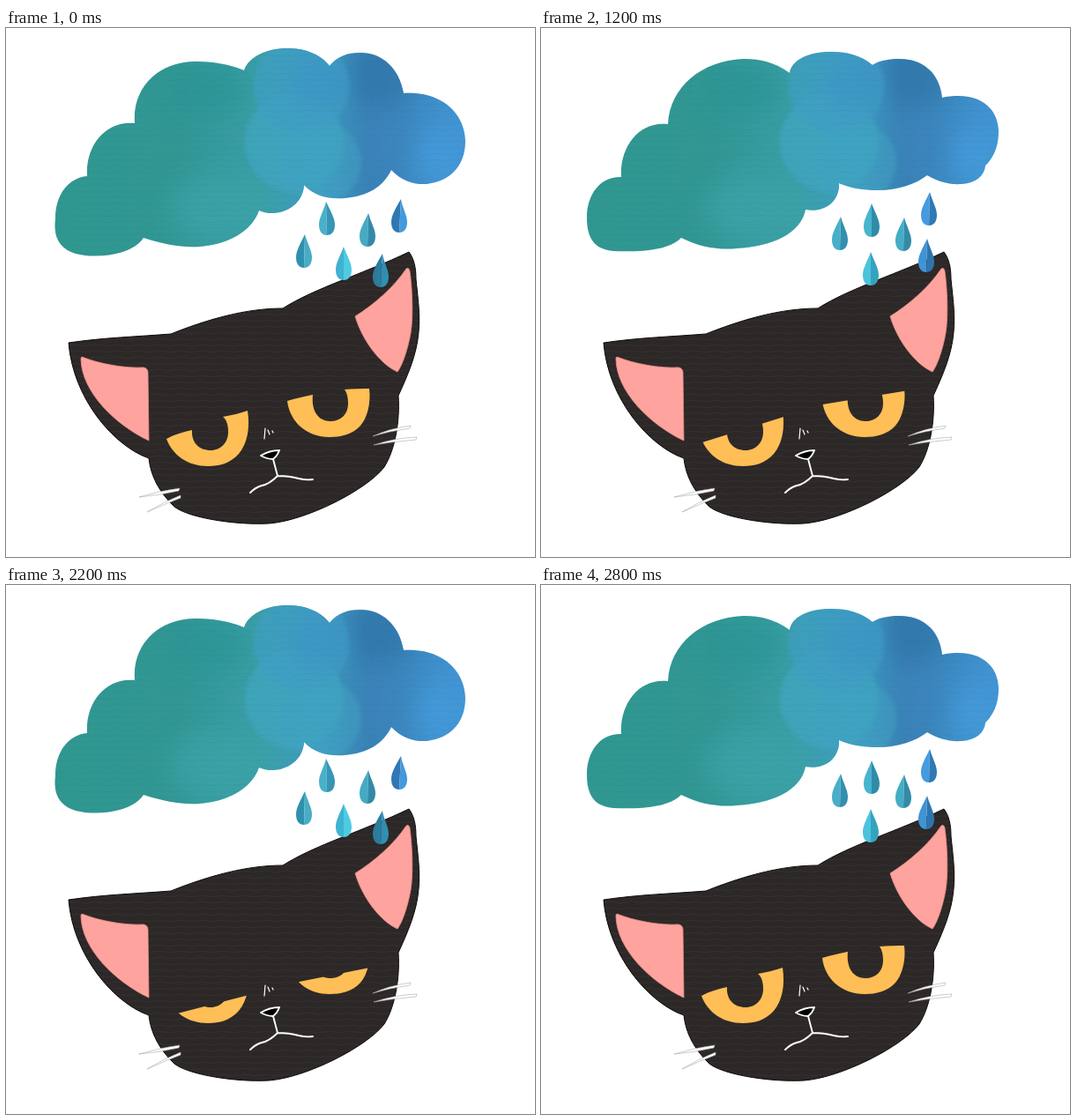
Write an HTML page that moves like this. It is 600 px wide and 600 px high and loops after 3 s.

```html
<!DOCTYPE html>
<html lang="en">
<head>
<meta charset="utf-8">
<title>Rainy cat</title>
<style>
  html, body { margin: 0; width: 100%; height: 100%; overflow: hidden; background: #fff; }
  svg { display: block; width: 100vw; height: 100vh; }
</style>
</head>
<body>
<svg viewBox="0 0 600 600">
  <defs>
    <linearGradient id="sky" gradientUnits="userSpaceOnUse" x1="60" y1="0" x2="520" y2="0">
      <stop offset="0" stop-color="#309790"/>
      <stop offset=".3" stop-color="#329794"/>
      <stop offset=".5" stop-color="#3b9fa8"/>
      <stop offset=".64" stop-color="#3f9dc0"/>
      <stop offset=".77" stop-color="#3981b5"/>
      <stop offset="1" stop-color="#4295d4"/>
    </linearGradient>
    <filter id="soft" x="-30%" y="-30%" width="160%" height="160%"><feGaussianBlur stdDeviation="14"/></filter>
    <filter id="edge" x="-10%" y="-10%" width="120%" height="120%"><feGaussianBlur stdDeviation="2"/></filter>
    <pattern id="fur" width="24" height="7" patternUnits="userSpaceOnUse">
      <path d="M0 3q6-1.5 12 0t12 0" fill="none" stroke="#4a3f3c" stroke-opacity=".28"/>
    </pattern>
    <pattern id="paper" width="24" height="7" patternUnits="userSpaceOnUse">
      <path d="M0 3q6-1.5 12 0t12 0" fill="none" stroke="#14606e" stroke-opacity=".07"/>
    </pattern>
    <clipPath id="cloudClip"><path id="cloud"/></clipPath>
    <clipPath id="lidClip"><path id="lid"/></clipPath>
    <path id="head" d="M71 357C112 351 150 350 187 347C230 330 272 318 314 318C350 295 405 279 457 254
      C463 262 465 272 465 285C467 305 470 325 468 345C466 370 456 393 445 417C447 447 441 479 429 498
      C409 524 340 559 298 562C262 564 208 556 191 543C174 527 164 508 162 488C122 474 76 420 71 357Z"/>
  </defs>

  <g clip-path="url(#cloudClip)">
    <rect x="40" y="10" width="500" height="260" fill="url(#sky)"/>
    <g filter="url(#soft)">
      <ellipse cx="240" cy="205" rx="55" ry="40" fill="#3ba3a8" opacity=".8"/>
      <ellipse cx="230" cy="70" rx="45" ry="30" fill="#2c9595" opacity=".7"/>
      <ellipse cx="425" cy="55" rx="38" ry="36" fill="#2f76a9" opacity=".8"/>
      <ellipse cx="430" cy="130" rx="28" ry="45" fill="#3b83bd" opacity=".7"/>
      <ellipse cx="490" cy="145" rx="25" ry="35" fill="#459bdc" opacity=".8"/>
    </g>
    <g filter="url(#edge)">
      <circle cx="327" cy="130" r="56" fill="#42a6c0" opacity=".75"/>
      <circle cx="335" cy="66" r="54" fill="#419ec4" opacity=".7"/>
      <circle cx="358" cy="152" r="45" fill="#41a1c3" opacity=".5"/>
    </g>
    <ellipse cx="355" cy="65" rx="32" ry="35" fill="#3c92c6" opacity=".6" filter="url(#soft)"/>
    <rect x="40" y="10" width="500" height="260" fill="url(#paper)"/>
  </g>

  <use href="#head" fill="#2c2827" stroke="#0c0a0a" stroke-width="1"/>
  <use href="#head" fill="url(#fur)"/>
  <g fill="#fea39d" stroke="#e98f89" stroke-width=".8">
    <path d="M86 373C106 381 134 386 156 385Q161 386 161 391L162 468C124 450 86 413 85 376Q85 373 86 373Z"/>
    <path d="M454 273Q457 271 458 276C461 297 462 329 459 346C456 363 450 382 444 390C424 381 404 354 396 327C417 314 440 294 454 273Z"/>
  </g>

  <g id="eyes" fill="#ffbe56" clip-path="url(#lidClip)">
    <path d="M182 466C191 461 201 458 211 456C210 470 219 479 232 479C244 479 252 470 252 458C252 450 250 444 246 441C256 439 266 437 274 434C277 453 274 471 264 483C254 494 242 497 229 497C207 497 189 485 182 466Z"/>
    <path d="M319 423C328 420 338 418 348 416C346 434 354 446 368 446C380 446 388 438 388 426C388 420 387 414 384 410C394 409 404 409 412 409C414 425 410 442 402 451C393 461 380 464 367 464C341 464 322 447 319 423Z"/>
  </g>
  <g id="shut" fill="none" stroke="#000" stroke-width="3.6" stroke-linecap="round">
    <path d="M193 485C203 495 217 499 231 498C256 497 274 484 276 465"/>
    <path d="M335 453C347 463 358 465 369 465C392 464 406 452 410 435"/>
  </g>

  <g fill="none" stroke="#fff" stroke-width="1.9" stroke-linecap="round" stroke-linejoin="round">
    <path d="M289 485Q299 479 310 479Q308 485 303 489Q296 489 289 485Z" fill="#000"/>
    <path d="M303 489L308 508C301 515 296 518 290 519Q283 521 277 527M308 508C318 508 325 509 332 511Q340 513 348 512"/>
    <path d="M294 454L293 466M297 456L299 461M302 457L303 459" stroke-width="1.2"/>
  </g>
  <g fill="#fff" stroke="#aaa" stroke-width=".6">
    <path d="M151 532Q174 525 197 522L196 525Q174 530 151 532Z"/>
    <path d="M160 549Q178 538 198 530L198 533Q180 540 160 549Z"/>
    <path d="M416 463Q436 454 459 451L458 454Q436 457 416 463Z"/>
    <path d="M417 473Q440 465 466 464L465 467Q440 469 417 473Z"/>
  </g>
  <g id="rain"></g>
</svg>
<script>
const $ = id => document.getElementById(id);

const clouds = [
  'M92 168C70 170 56 190 56 216C53 240 63 251 79 256C102 262 143 258 156 238C181 246 199 249 219 248C250 246 278 232 287 207C306 216 337 205 338 178C350 191 366 194 384 193C410 191 428 180 437 161C448 173 463 178 477 177C503 174 521 157 521 128C520 95 492 71 451 74C446 45 426 28 402 28C387 28 376 32 367 43C355 28 337 23 319 23C295 23 275 33 270 48C250 40 231 38 213 38C174 39 143 66 146 108C113 105 90 133 92 168Z',
  'M91 169C68 168 52 188 52 215C52 239 61 251 82 253C112 254 144 253 159 238C181 249 203 252 222 250C262 248 295 233 300 206C320 210 339 198 338 176C352 182 366 184 383 184C405 184 425 177 438 167C450 174 463 178 477 177C494 176 503 167 504 156C514 146 519 134 519 117C518 88 494 71 455 79C452 50 432 35 406 35C394 35 384 37 376 42C363 31 347 27 329 27C302 27 284 37 282 51C266 39 249 35 230 35C182 37 146 67 144 109C112 105 89 134 91 169Z'
];

// tip x, tip y, lean, left colour, right colour
const rains = [
  [[363, 197, 1, '#4ab0ca', '#3795b5'], [339, 234, -1, '#2f90ae', '#48acc5'],
   [383, 248, 0, '#3fb3cf', '#4ecbe2'], [411, 210, -1, '#45aac4', '#3389a8'],
   [448, 194, -2, '#2f78b4', '#4399db'], [427, 256, -2, '#2c7c9d', '#318fb2']],
  [[340, 214, -1, '#49aec9', '#338fae'], [375, 199, 0, '#48b4cd', '#308ba8'],
   [412, 215, -1, '#44adc6', '#338aa7'], [441, 186, -1, '#449be0', '#3079b3'],
   [374, 254, 0, '#4bc3dc', '#36a3be'], [438, 239, -1, '#3f94d4', '#2f75ad']]
];

// eyelid heights: left eye at x 175 and 285, right eye at x 310 and 420
const lids = [[400, 400, 400, 400], [472.5, 438, 428.5, 410.5], [481.5, 452.5, 444, 423.5], [491, 462.5, 454.5, 432.5]];
const CLOSED = 4;

// start time, sky pose, lid level
const steps = [
  [0, 0, 0], [400, 1, 0], [800, 0, 0], [1200, 1, 1], [1400, 1, 2], [1600, 1, 3],
  [1800, 0, CLOSED], [2200, 0, 3], [2400, 1, 2], [2600, 1, 1], [2800, 1, 0]
];

function drop([x, y, lean, left, right]) {
  const side = (w, fill) => `<path fill="${fill}" d="M${x} ${y}c${w * .35 + lean} 9 ${w + lean} 18 ${w + lean} 26c0 8 ${-w * .4} 12 ${-w} 12z"/>`;
  return side(-9, left) + side(9, right);
}

const rainPoses = rains.map(list => `<g>${list.map(drop).join('')}</g>`);
$('rain').innerHTML = rainPoses.join('');

function pose([, sky, level]) {
  $('cloud').setAttribute('d', clouds[sky]);
  [...$('rain').children].forEach((g, i) => g.style.display = i === sky ? '' : 'none');
  const shut = level === CLOSED;
  $('shut').style.display = shut ? '' : 'none';
  $('eyes').style.display = shut ? 'none' : '';
  if (shut) return;
  const [a, b, c, d] = lids[level];
  $('lid').setAttribute('d', `M175 ${a}L285 ${b}V510H175ZM310 ${c}L420 ${d}V480H310Z`);
}

let current;
function tick(now) {
  const t = now % 3000;
  const step = steps.findLast(s => s[0] <= t);
  if (step !== current) pose(current = step);
  requestAnimationFrame(tick);
}
tick(0);
</script>
</body>
</html>
```
